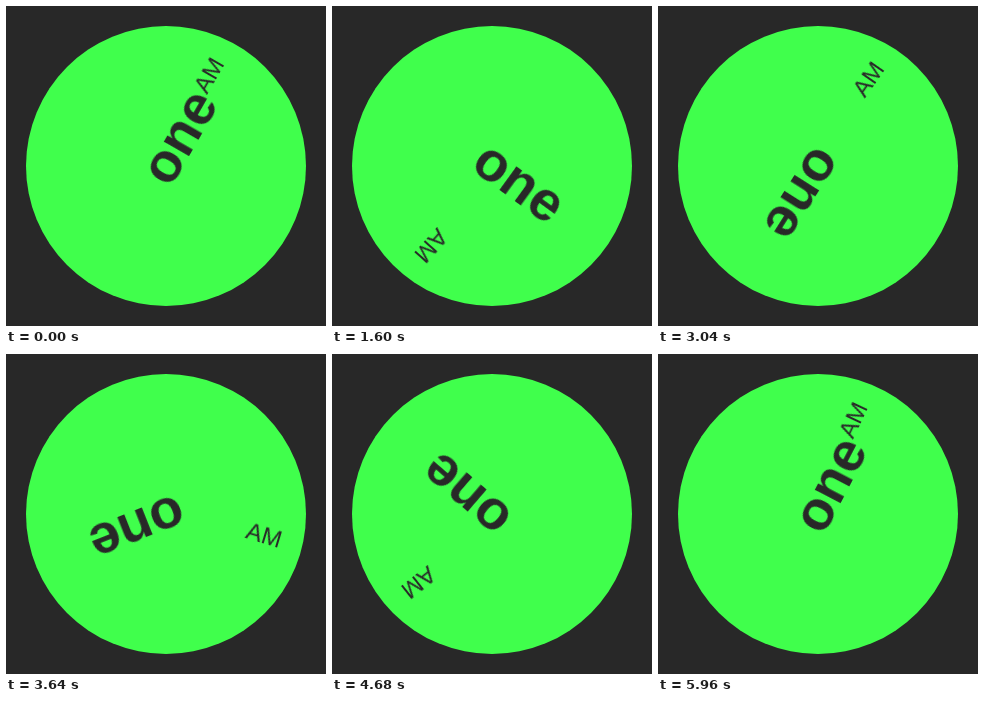
Animation, 320 px wide and 320 px high, one loop 6000 ms. Source, as an HTML page:

```html
<!DOCTYPE html>
<html lang="en">
<head>
<meta charset="utf-8">
<title>Word clock</title>
<style>
  html, body { margin: 0; width: 100%; height: 100%; overflow: hidden; background: #282828; }
  svg { display: block; width: 100vw; height: 100vh; }
  text { fill: #282828; font-family: "Liberation Sans", Arial, sans-serif; text-rendering: geometricPrecision; }
  #hour { font-size: 55px; font-weight: 700; }
  #minute { font-size: 24px; text-anchor: middle; }
</style>
</head>
<body>
<svg viewBox="0 0 320 320">
  <g transform="translate(160 160)">
    <circle r="140" fill="#40ff4c"/>
    <g id="hour"><text x="-17.3" y="14.6">one</text></g>
    <g id="minute"><text x="100" y="0">AM</text></g>
  </g>
</svg>
<script>
  const LOOP = 6000;
  const STEPS = 150;
  const START = -60;

  // The small lead keeps each step boundary clear of rounding.
  function spin(id, turns) {
    document.getElementById(id).animate(
      [
        { transform: `rotate(${START}deg)`, easing: `steps(${STEPS}, end)` },
        { transform: `rotate(${START + 360 * turns}deg)` }
      ],
      { duration: LOOP, iterations: Infinity, delay: -2 }
    );
  }

  spin("hour", 1);
  spin("minute", 2);
</script>
</body>
</html>
```
